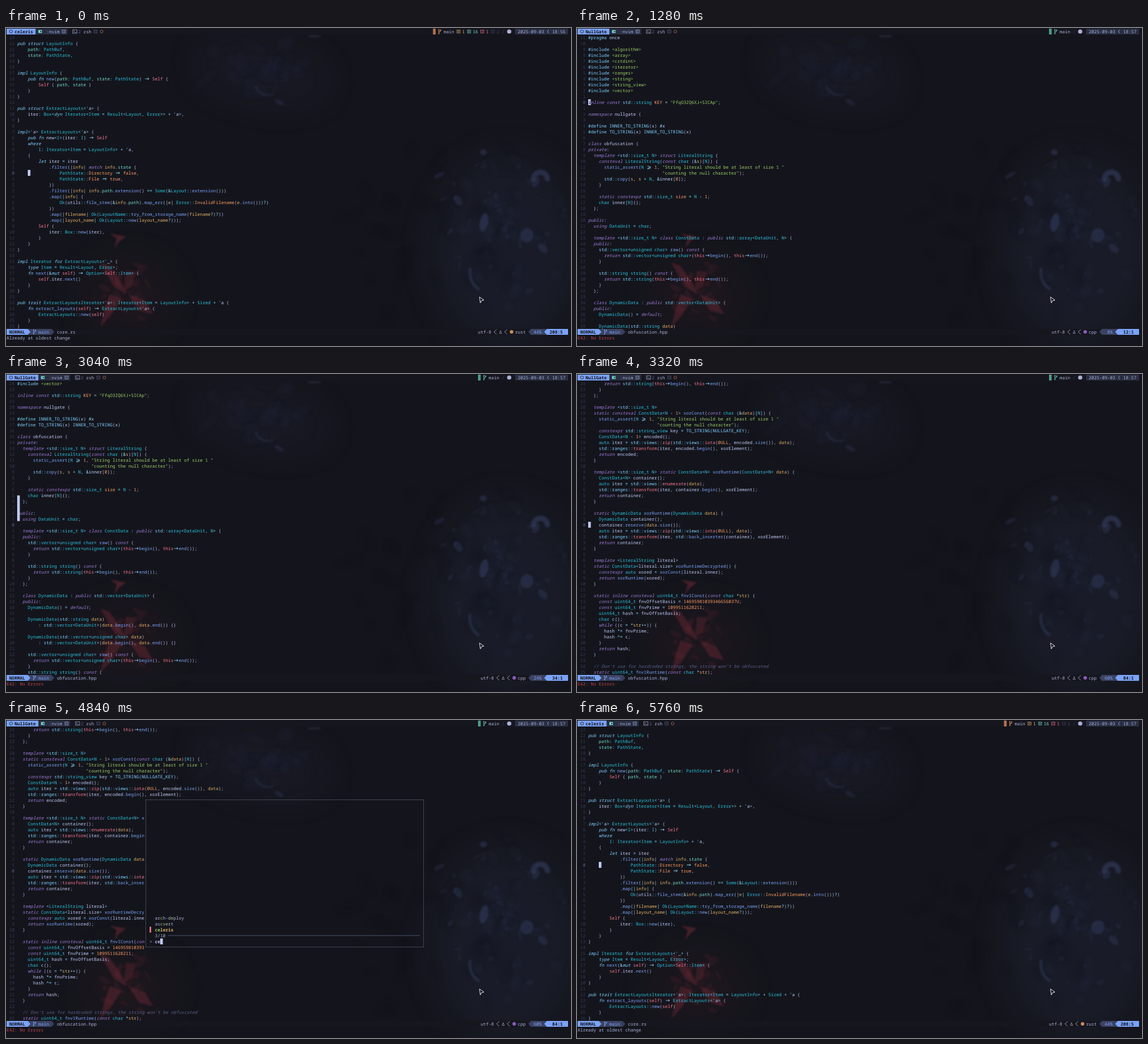
Recreate the animation shown at these times as an HTML page with a canvas. Size 960 by 540 pixels, loop 5.8 s.

```html
<!DOCTYPE html>
<html lang="en">
<head>
<meta charset="utf-8">
<title>Terminal sessions</title>
<style>
  html, body { margin: 0; width: 100%; height: 100%; overflow: hidden; background: #14151c; }
  canvas { display: block; }
</style>
</head>
<body>
<canvas id="stage" width="960" height="540"></canvas>
<script>
const LOOP = 5800, CW = 4.5, CH = 10, ROWS = 50;
const C = {
  fg: '#c0caf5', soft: '#a9b1d6', dim: '#3b4261', num: '#343950', panel: '#292e42', bar: '#16161e',
  blue: '#7aa2f7', cyan: '#7dcfff', type: '#2ac3de', teal: '#73daca', green: '#9ece6a', orange: '#ff9e64',
  yellow: '#e0af68', red: '#f7768e', purple: '#9d7cd8', op: '#89ddff', comment: '#565f89', error: '#c0414a'
};

const rustCode = `
pub struct LayoutInfo {
    path: PathBuf,
    state: PathState,
}

impl LayoutInfo {
    pub fn new(path: PathBuf, state: PathState) -> Self {
        Self { path, state }
    }
}

pub struct ExtractLayouts<'a> {
    iter: Box<dyn Iterator<Item = Result<Layout, Error>> + 'a>,
}

impl<'a> ExtractLayouts<'a> {
    pub fn new<I>(iter: I) -> Self
    where
        I: Iterator<Item = LayoutInfo> + 'a,
    {
        let iter = iter
            .filter(|info| match info.state {
                PathState::Directory => false,
                PathState::File => true,
            })
            .filter(|info| info.path.extension() == Some(&Layout::extension()))
            .map(|info| {
                Ok(utils::file_stem(&info.path).map_err(|e| Error::InvalidFilename(e.into()))?)
            })
            .map(|filename| Ok(LayoutName::try_from_storage_name(filename?)?))
            .map(|layout_name| Ok(Layout::new(layout_name?)));
        Self {
            iter: Box::new(iter),
        }
    }
}

impl Iterator for ExtractLayouts<'_> {
    type Item = Result<Layout, Error>;
    fn next(&mut self) -> Option<Self::Item> {
        self.iter.next()
    }
}

pub trait ExtractLayoutsIterator<'a>: Iterator<Item = LayoutInfo> + Sized + 'a {
    fn extract_layouts(self) -> ExtractLayouts<'a> {
        ExtractLayouts::new(self)
    }
}`;

const cppCode = `#pragma once

#include <algorithm>
#include <array>
#include <cstdint>
#include <iterator>
#include <ranges>
#include <string>
#include <string_view>
#include <vector>

inline const std::string KEY = "FfqO3ZQ6XJ+SICAp";

namespace nullgate {

#define INNER_TO_STRING(x) #x
#define TO_STRING(x) INNER_TO_STRING(x)

class obfuscation {
private:
  template <std::size_t N> struct LiteralString {
    consteval LiteralString(const char (&s)[N]) {
      static_assert(N >= 1, "String literal should be at least of size 1 "
                            "counting the null character");
      std::copy(s, s + N, &inner[0]);
    }

    static constexpr std::size_t size = N - 1;
    char inner[N]{};
  };

public:
  using DataUnit = char;

  template <std::size_t N> class ConstData : public std::array<DataUnit, N> {
  public:
    std::vector<unsigned char> raw() const {
      return std::vector<unsigned char>(this->begin(), this->end());
    }

    std::string string() const {
      return std::string(this->begin(), this->end());
    }
  };

  class DynamicData : public std::vector<DataUnit> {
  public:
    DynamicData() = default;

    DynamicData(std::string data)
        : std::vector<DataUnit>(data.begin(), data.end()) {}

    DynamicData(std::vector<unsigned char> data)
        : std::vector<DataUnit>(data.begin(), data.end()) {}

    std::vector<unsigned char> raw() const {
      return std::vector<unsigned char>(this->begin(), this->end());
    }
    std::string string() const {
      return std::string(this->begin(), this->end());
    }
  };

  template <std::size_t N>
  static consteval ConstData<N - 1> xorConst(const char (&data)[N]) {
    static_assert(N >= 1, "String literal should be at least of size 1 "
                          "counting the null character");
    constexpr std::string_view key = TO_STRING(NULLGATE_KEY);
    ConstData<N - 1> encoded{};
    auto iter = std::views::zip(std::views::iota(0ULL, encoded.size()), data);
    std::ranges::transform(iter, encoded.begin(), xorElement);
    return encoded;
  }

  template <std::size_t N> static ConstData<N> xorRuntime(ConstData<N> data) {
    ConstData<N> container{};
    auto iter = std::views::enumerate(data);
    std::ranges::transform(iter, container.begin(), xorElement);
    return container;
  }

  static DynamicData xorRuntime(DynamicData data) {
    DynamicData container{};
    container.reserve(data.size());
    auto iter = std::views::zip(std::views::iota(0ULL), data);
    std::ranges::transform(iter, std::back_inserter(container), xorElement);
    return container;
  }

  template <LiteralString literal>
  static ConstData<literal.size> xorRuntimeDecrypted() {
    constexpr auto xored = xorConst(literal.inner);
    return xorRuntime(xored);
  }

  static inline consteval uint64_t fnv1Const(const char *str) {
    const uint64_t fnvOffsetBasis = 14695981039346656037U;
    const uint64_t fnvPrime = 1099511628211;
    uint64_t hash = fnvOffsetBasis;
    char c{};
    while ((c = *str++)) {
      hash *= fnvPrime;
      hash ^= c;
    }
    return hash;
  }

  // Don't use for hardcoded strings, the string won't be obfuscated
  static uint64_t fnv1Runtime(const char *str);`;

// Highlighting: the first rule that matches wins.
const common = [
  [/->|=>|>=/, C.op], [/\b[A-Z]\w*/, C.type], [/\w+(?=\()/, C.blue],
  [/\b\d\w*/, C.orange], [/\w+/, C.fg], [/[(){}[\],;]/, C.soft], [/[^\w\s]/, C.op]
];
const rustRules = [
  [/\b(?:pub|struct|impl|fn|where|let|dyn|for|type|trait|mut)\b/, C.cyan, 'italic'],
  [/\bmatch\b/, C.purple, 'italic'],
  [/\b[Ss]elf\b/, C.red],
  [/\b(?:true|false|Directory|File(?= )|InvalidFilename)\b/, C.orange],
  [/\b(?:info|filename|layout_name|e)\b(?!\()/, C.yellow],
  [/\b(?:path|state)\b/, C.teal],
  ...common
];
const cppRules = [
  [/\/\/.*/, C.comment, 'italic'],
  [/".*?"|<(?:algorithm|array|cstdint|iterator|ranges|string|string_view|vector)>/, C.green],
  [/#(?:pragma|include|define)/, C.cyan],
  [/\b(?:inline|const|namespace|class|struct|template|static|constexpr|consteval|using|public|private|return|while|default)\b/, C.purple, 'italic'],
  [/\bthis\b/, C.red],
  [/\bKEY\b|\bsize(?= =)/, C.orange],
  [/\b[A-Z]+_[A-Z_]+/, C.cyan],
  [/\b(?:std|ranges|views)(?=::)/, C.cyan],
  [/\b(?:zip|iota|enumerate|transform)\b/, C.red],
  [/\b(?:char|unsigned|auto|size_t|uint64_t|string_view|string|vector|array)\b/, C.type],
  [/\b(?:data|s|str)\b/, C.yellow],
  ...common
];

function highlight(code, rules) {
  const re = new RegExp(rules.map(r => `(${r[0].source})`).join('|'), 'g');
  return code.split('\n').map(line => [...line.matchAll(re)].map(m => {
    const [, color, style] = rules[m.findIndex((g, i) => i && g !== undefined) - 1];
    return { text: m[0], col: m.index, color, style };
  }));
}

const sessions = {
  celeris: { lines: highlight(rustCode, rustRules), first: 185, file: 'core.rs', lang: 'rust', langColor: '#d08a5c',
             message: 'Already at oldest change', messageColor: C.soft, column: 5 },
  NullGate: { lines: highlight(cppCode, cppRules), first: 1, file: 'obfuscation.hpp', lang: 'cpp', langColor: '#8a5cc0',
              message: 'E42: No Errors', messageColor: C.error, column: 1 }
};
// Best match first; the picker lists it from the bottom up.
const projects = ['celeris', 'NullGate', 'ascvert', 'volumen', 'arch-deploy', 'arch-install',
                  'keymap', 'wallset', 'ptytest', 'dotfiles'];

const steps = [
  [0, { session: 'celeris', top: 185, line: 208, pct: '44%', clock: '18:56', query: null }],
  [440, { query: '' }], [760, { query: 'n' }], [920, { query: 'nu' }], [1040, { query: 'nul' }],
  [1200, { session: 'NullGate', top: 1, line: 12, pct: '8%', clock: '18:57', query: null }],
  [3040, { top: 10, line: 34, pct: '24%' }],
  [3160, { top: 35, line: 59, pct: '42%' }],
  [3280, { top: 60, line: 84, pct: '60%' }],
  [4440, { query: '' }], [4640, { query: 'c' }], [4760, { query: 'ce' }], [4920, { query: 'cel' }],
  [5080, { session: 'celeris', top: 185, line: 208, pct: '44%', query: null }]
];
const JUMP = 3000;

const ctx = document.getElementById('stage').getContext('2d');
ctx.textRendering = 'geometricPrecision';
const X = col => 1 + col * CW, Y = row => 1 + row * CH;
const ligatures = { '->': '→', '=>': '⇒', '>=': '⩾' };

function put(text, col, row, color, style = '') {
  ctx.fillStyle = color;
  ctx.textAlign = 'center';
  const y = Y(row) + 7.6;
  if (ligatures[text]) {
    ctx.font = '9px "DejaVu Sans", sans-serif';
    ctx.fillText(ligatures[text], X(col + 1), y + .6);
    return;
  }
  ctx.font = `${style} 7.5px "Noto Sans Mono", monospace`;
  [...text].forEach((ch, i) => ch !== ' ' && ctx.fillText(ch, X(col + i + .5), y));
}
function fill(col, row, cols, color, rows = 1) {
  ctx.fillStyle = color;
  ctx.fillRect(X(col), Y(row), cols * CW, rows * CH);
}
function path(points, stroke, fillColor, width = 1) {
  ctx.beginPath();
  points.forEach(p => ctx.lineTo(...p));
  if (fillColor) { ctx.closePath(); ctx.fillStyle = fillColor; ctx.fill(); }
  if (stroke) { ctx.strokeStyle = stroke; ctx.lineWidth = width; ctx.stroke(); }
}
// Powerline wedge in one cell; dir 1 points right, -1 left.
function wedge(col, row, color, dir) {
  const base = X(dir > 0 ? col : col + 1);
  path([[base, Y(row)], [base + dir * CW, Y(row) + 5], [base, Y(row + 1)]], null, color);
}
function chevron(col, row, color = C.soft) {
  path([[X(col + 1), Y(row) + 1], [X(col), Y(row) + 5], [X(col + 1), Y(row) + 9]], color, null, .8);
}
function dot(x, y, r, color) {
  ctx.fillStyle = color;
  ctx.beginPath(); ctx.arc(x, y, r, 0, 7); ctx.fill();
}
function ring(x, y, r, color) {
  ctx.strokeStyle = color; ctx.lineWidth = .8;
  ctx.beginPath(); ctx.arc(x, y, r, 0, 7); ctx.stroke();
}
function boxIcon(col, color, mark = '') {
  ctx.strokeStyle = color; ctx.lineWidth = .7;
  ctx.strokeRect(X(col) + .2, 3.4, 5.2, 5.2);
  if (mark) path([[X(col) + 1.5, 6], [X(col) + 4.1, 6]], color, null, .8);
  if (mark === '+') path([[X(col) + 2.8, 4.7], [X(col) + 2.8, 7.3]], color, null, .8);
}
function promptIcon(col, color) {
  const x = X(col);
  ctx.strokeStyle = color; ctx.lineWidth = .7;
  ctx.strokeRect(x, 3, 7, 6);
  path([[x + 1.5, 4.5], [x + 3, 6], [x + 1.5, 7.5]], color, null, .7);
  path([[x + 3.6, 7.5], [x + 5.6, 7.5]], color, null, .7);
}
function branch(col, row, color) {
  const x = X(col) + 1, y = Y(row);
  path([[x, y + 2], [x, y + 8.5]], color, null, .9);
  path([[x, y + 6], [x + 3, y + 4.5], [x + 3, y + 2.5]], color, null, .9);
  dot(x, y + 2, .9, color); dot(x, y + 8.3, .9, color); dot(x + 3, y + 2.5, .9, color);
}

function paintWallpaper() {
  const canvas = document.createElement('canvas');
  canvas.width = 960; canvas.height = 540;
  const g = canvas.getContext('2d');
  g.fillStyle = '#14151c'; g.fillRect(0, 0, 960, 540);
  let seed = 11;
  const rnd = () => (seed = seed * 16807 % 2147483647) / 2147483647;
  const blue = a => `rgba(58,68,108,${a})`, red = a => `rgba(118,44,56,${a})`;
  const blob = (x, y, rx, ry, turn, color) => {
    g.fillStyle = color;
    g.beginPath(); g.ellipse(x, y, rx, ry, turn, 0, 7); g.fill();
  };
  // Small marks, denser towards the middle of an ellipse.
  const scatter = (n, x, y, rx, ry, size, color) => {
    while (n--) {
      const turn = rnd() * 6.3, far = rnd();
      blob(x + Math.cos(turn) * far * rx, y + Math.sin(turn) * far * ry,
           2 + rnd() * size, 1 + rnd() * size / 2, rnd() * 3, color);
    }
  };
  const swirl = (x, y, r, from, to, width, color) => {
    g.strokeStyle = color; g.lineWidth = width; g.lineCap = 'round';
    g.beginPath(); g.arc(x, y, r, from, to); g.stroke();
  };
  const shard = (color, ...points) => {
    g.fillStyle = color;
    g.beginPath(); points.forEach(p => g.lineTo(...p)); g.fill();
  };
  g.filter = 'blur(30px)';
  blob(850, 380, 120, 160, 0, blue(.16));
  blob(435, 75, 110, 45, .2, blue(.12));
  blob(205, 455, 75, 60, 0, red(.1));
  g.filter = 'blur(4px)';
  scatter(24, 440, 70, 120, 50, 22, blue(.07));
  scatter(40, 740, 340, 200, 170, 20, 'rgba(8,9,14,.14)');
  scatter(40, 850, 340, 110, 150, 14, blue(.1));
  g.filter = 'blur(1.5px)';
  scatter(40, 840, 330, 115, 130, 8, blue(.13));
  scatter(24, 210, 450, 75, 65, 10, red(.14));
  swirl(908, 257, 12, 3.2, 6.2, 9, blue(.5));
  blob(900, 262, 6, 9, .5, blue(.3));
  blob(811, 211, 6, 5, 0, blue(.4));
  blob(812, 330, 7, 16, .2, blue(.45));
  blob(885, 352, 11, 12, .4, blue(.4));
  blob(768, 293, 6, 10, -.6, blue(.3));
  blob(736, 250, 10, 4, -.5, blue(.25));
  blob(912, 374, 10, 6, .8, blue(.3));
  swirl(822, 415, 34, 2.2, 3.3, 5, blue(.4));
  swirl(445, 92, 22, 1.2, 2.8, 4, blue(.25));
  blob(464, 126, 9, 4, .5, blue(.25));
  blob(524, 14, 12, 2, 0, 'rgba(70,76,100,.3)');
  shard(red(.5), [176, 349], [204, 354], [192, 363], [184, 374], [188, 357]);
  shard(red(.4), [160, 398], [176, 404], [196, 432], [205, 452], [184, 440]);
  shard(red(.4), [176, 452], [196, 460], [178, 488], [160, 508], [168, 476]);
  shard(red(.4), [208, 452], [236, 462], [250, 486], [226, 480]);
  shard(red(.3), [204, 412], [222, 414], [212, 440], [200, 446]);
  return canvas;
}
const wallpaper = paintWallpaper();

function drawTopBar(s) {
  const n = s.session.length, rust = s.session === 'celeris';
  fill(0, 0, 212, C.bar);
  fill(0, 0, n + 4, C.blue);
  ring(X(1) + 3, 6, 2.6, C.bar);
  put(s.session, 3, 0, C.bar, 'bold');
  fill(n + 4, 0, 12, C.panel);
  ctx.fillStyle = C.teal; ctx.fillRect(X(n + 5), 3.5, 6, 5);
  ctx.fillStyle = C.panel; ctx.fillRect(X(n + 5) + 3, 5, 2, 2);
  put(':', n + 8, 0, C.red);
  put('nvim', n + 9, 0, C.soft);
  boxIcon(n + 14, C.soft, '-');
  promptIcon(n + 18, C.soft);
  put('2', n + 20, 0, C.comment);
  put('zsh', n + 22, 0, C.soft);
  boxIcon(n + 26, C.comment, '-');
  ring(X(n + 28) + 4, 6, 2.4, '#b0705a');

  const base = rust ? 161 : 178;
  fill(base, 0, 1, rust ? '#b0714f' : '#4f9a86');
  branch(base + 2, 0, rust ? C.orange : C.teal);
  put('main', base + 4, 0, C.soft);
  if (rust) {
    [[170, C.yellow, '1', '+'], [174, C.teal, '16', '+'], [179, C.red, '1', '-'], [183, C.dim, '2', '-']]
      .forEach(([col, color, count, mark]) => {
        boxIcon(col, color, mark);
        put(count, col + 2, 0, color);
      });
  }
  put('/', 187, 0, C.dim);
  dot(855, 6, 3.6, C.soft);
  fill(192, 0, 20, C.panel);
  put('2025-09-03', 193, 0, C.soft);
  path([[922, 3], [920, 6], [922, 9]], C.soft, null, .8);
  put(s.clock, 206, 0, C.soft);
}

function drawCode(s, file, t) {
  for (let i = 0; i < ROWS; i++) {
    const no = s.top + i, rel = String(Math.abs(no - s.line));
    put(rel, 3 - rel.length, i + 1, rel === '0' ? C.comment : C.num);
    for (const k of file.lines[no - file.first] || []) put(k.text, k.col + 4, i + 1, k.color, k.style);
  }
  if (s.query !== null) return;
  const col = file.column + 3, y = Y(s.line - s.top + 1);
  let from = y, to = y + CH;
  if (s.line > 12 && s.session === 'NullGate') {
    const gap = y - Y(12), age = t - JUMP;
    from -= gap * Math.exp(-age / 38.5);
    to -= gap * Math.exp(-age / 16.8);
  }
  ctx.fillStyle = C.fg;
  ctx.fillRect(X(col), from, CW, to - from);
  if (s.line === 12) put('i', col, 12, C.bar, 'italic');
}

function drawStatus(s, file) {
  const r = 51, shift = 4 - file.lang.length, place = `${s.line}:${file.column}`;
  fill(0, r, 212, C.bar);
  fill(8, r, 9, C.dim);
  fill(0, r, 8, C.blue);
  wedge(8, r, C.blue, 1);
  wedge(17, r, C.dim, 1);
  put('NORMAL', 1, r, C.bar, 'bold');
  branch(10, r, C.blue);
  put('main', 12, r, C.blue);
  put(file.file, 19, r, C.soft);
  put('utf-8', 178 + shift, r, C.soft);
  chevron(184 + shift, r);
  put('Δ', 186 + shift, r, C.soft);
  chevron(188 + shift, r);
  dot(X(190 + shift) + 3, 516, 3, file.langColor);
  put(file.lang, 192 + shift, r, C.soft);
  wedge(197, r, C.dim, -1);
  fill(198, r, 6, C.dim);
  put(s.pct, 202 - s.pct.length, r, C.blue);
  wedge(203, r, C.blue, -1);
  fill(204, r, 8, C.blue);
  put(place, 210 - place.length, r, C.bar, 'bold');
  put(file.message, 0, 52, file.messageColor);
}

// Indexes of the query's letters in the name, or null when it does not match.
function fuzzy(name, query) {
  const hits = [];
  let at = -1;
  for (const ch of query) {
    at = name.toLowerCase().indexOf(ch, at + 1);
    if (at < 0) return null;
    hits.push(at);
  }
  return hits;
}

function drawPicker(query) {
  const x = X(52), y = Y(13), w = 106 * CW, h = 26 * CH;
  ctx.drawImage(wallpaper, x, y, w, h, x, y, w, h);
  ctx.strokeStyle = '#41444f'; ctx.lineWidth = 1;
  ctx.strokeRect(237.5, 135.5, 472, 250);
  const found = projects.map(name => ({ name, hits: fuzzy(name, query) })).filter(p => p.hits);
  found.forEach(({ name, hits }, i) => {
    [...name].forEach((ch, k) => put(ch, 56 + k, 35 - i,
      hits.includes(k) ? C.green : i ? C.soft : C.yellow, i ? '' : 'bold'));
  });
  ctx.fillStyle = C.red; ctx.fillRect(244, Y(35), 2.5, CH);
  const count = `${found.length}/${projects.length}`;
  put(count, 56, 36, C.soft);
  path([[X(57 + count.length), 366], [703, 366]], '#4a5070');
  put('>', 54, 37, C.soft);
  put(query, 56, 37, C.fg, 'bold');
  fill(56 + query.length, 37, 1, C.fg);
}

function frame(now) {
  const t = now % LOOP;
  const s = Object.assign({}, ...steps.filter(e => e[0] <= t).map(e => e[1]));
  const file = sessions[s.session];
  ctx.drawImage(wallpaper, 0, 0);
  drawTopBar(s);
  drawCode(s, file, t);
  drawStatus(s, file);
  if (s.query !== null) drawPicker(s.query);
  const pointer = [[804.5, 456.8], [812, 462], [808, 463], [806, 466.8]];
  path([...pointer, pointer[0]], '#e8e8ee', '#0c0c10');
}
const start = performance.now();
(function loop() {
  frame(performance.now() - start);
  requestAnimationFrame(loop);
})();
</script>
</body>
</html>
```
